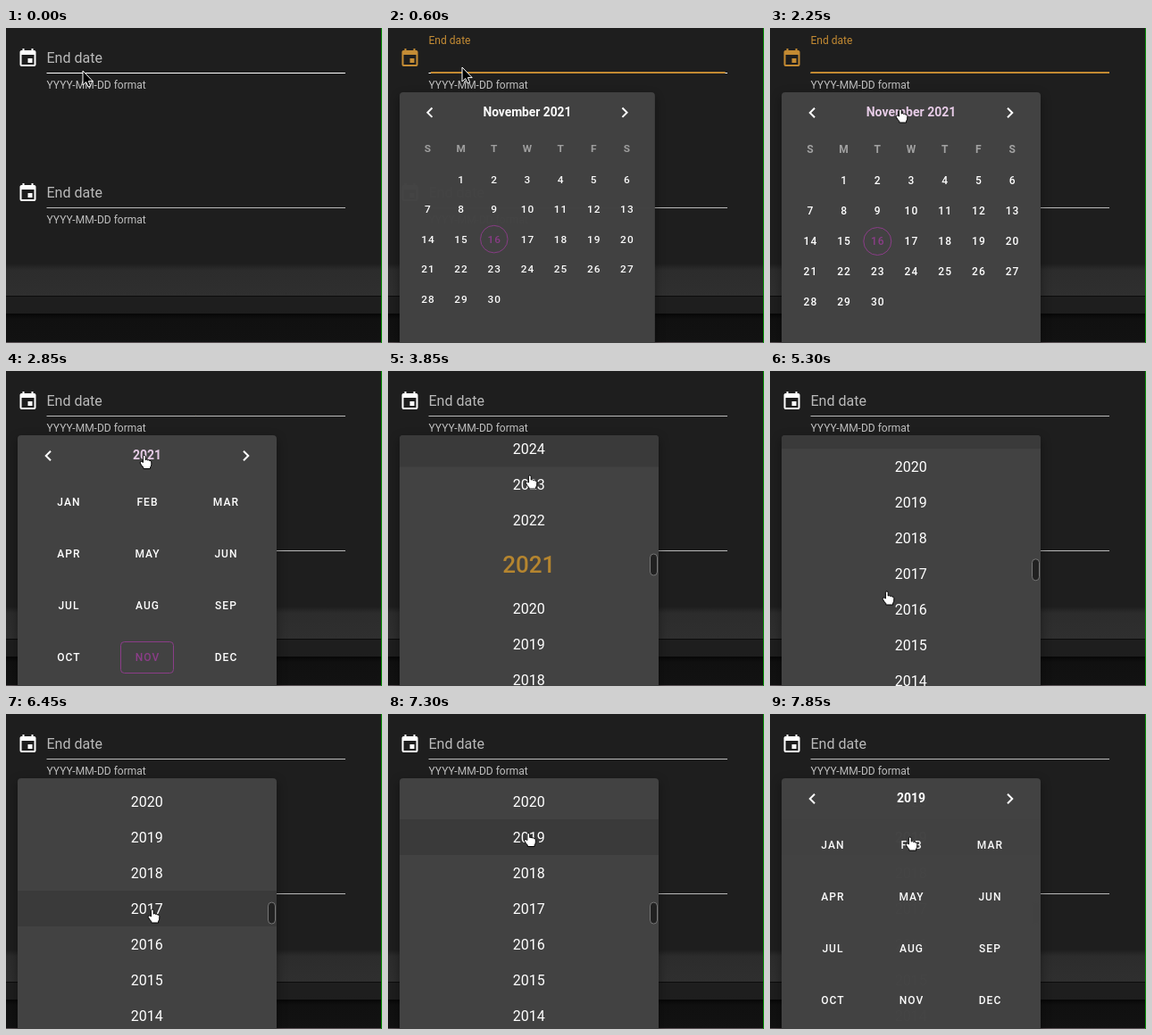
An HTML page that plays this animation: 421x353 px, repeating every 8 s.

```html
<!DOCTYPE html>
<html lang="en">
<head>
<meta charset="utf-8">
<title>Date picker</title>
<style>
  html, body { margin: 0; width: 100%; height: 100%; overflow: hidden; background: #1e1e1e; }
  svg { display: block; font-family: Roboto, sans-serif; font-size: 12px; fill: #fff; cursor: default; }
  .mid { text-anchor: middle; }
  .btn { font-weight: 500; letter-spacing: 1.07px; }
  .title { font-size: 14px; font-weight: 700; }
  .weekday { font-weight: 600; fill: #a2a2a2; }
  .today { fill: #8b3d88; }
  .ring { fill: none; stroke: #8b3d88; }
  .year { font-size: 16px; }
  .year.active { font-size: 26px; font-weight: 500; fill: #b5852f; }
  .sheet { fill: #424242; filter: drop-shadow(0 4px 6px rgba(0, 0, 0, .4)); }
</style>
</head>
<body>
<svg id="stage" width="421" height="353" viewBox="0 0 421 353">
  <defs>
    <linearGradient id="bar" x2="0" y2="1">
      <stop offset="0" stop-color="#1e1e1e"/>
      <stop offset=".2" stop-color="#2c2c2c"/>
      <stop offset="1" stop-color="#2f2f2f"/>
    </linearGradient>
    <linearGradient id="foot" x2="0" y2="1">
      <stop offset="0" stop-color="#070707"/>
      <stop offset=".2" stop-color="#101010"/>
      <stop offset="1" stop-color="#121212"/>
    </linearGradient>
    <clipPath id="sheetClip"><rect x="13" y="72" width="290" height="330" rx="4"/></clipPath>
  </defs>
  <rect width="421" height="353" fill="#1e1e1e"/>
  <rect y="264" width="421" height="36" fill="url(#bar)"/>
  <rect y="300" width="421" height="1" fill="#0c0c0c"/>
  <rect y="320" width="421" height="32" fill="url(#foot)"/>
  <rect y="352" width="421" height="1" fill="#5a5255"/>
  <rect x="420" width="1" height="353" fill="#0a920a"/>
  <g id="fields"></g>
  <g id="menu">
    <rect class="sheet" x="13" y="72" width="290" height="330" rx="4"/>
    <g clip-path="url(#sheetClip)">
      <g id="days"></g>
      <g id="months"></g>
      <g id="years"></g>
    </g>
  </g>
  <path id="arrow" d="M0 0V16L3.7 12.6L6.1 18L8.7 16.9L6.4 11.6H11.2Z" fill="#000" stroke="#fff"/>
  <path id="hand" fill="#fff" stroke="#000" stroke-linejoin="round"
    d="M-1.6 8V1.2Q-1.6 0 -.3 0Q1 0 1.2 1.2V5Q2.6 4 3.6 5.4Q5 4.6 5.8 6Q7.6 5.6 7.8 7.4V10Q7.8 12 6.6 13.2V15H-1.2V13.6Q-3.4 11.4 -4.8 8.6Q-5 7 -3.6 7Q-2.6 7 -1.6 8Z"/>
</svg>
<script>
const LOOP = 8000, STEP = 50;
const AMBER = [195, 138, 50], GREY = [186, 186, 186], WHITE = [255, 255, 255];
const CALENDAR = 'M19 19H5V8H19M16 1V3H8V1H6V3H5C3.89 3 3 3.89 3 5V19A2 2 0 0 0 5 21H19A2 2 0 0 0 21 19V5C21 3.89 20.1 3 19 3H18V1M17 12H12V17H17V12Z';
const LEFT = 'M15.41 16.58L10.83 12L15.41 7.41L14 6L8 12L14 18Z';
const RIGHT = 'M8.59 16.58L13.17 12L8.59 7.41L10 6L16 12L10 18Z';

// time, x, y of the pointer's tip
const POINTER = [
  [50, 86, 48], [150, 83, 44], [1400, 83, 44], [1450, 84.5, 46], [1800, 84.5, 46], [1850, 85, 47.5],
  [1950, 85, 47.5], [2050, 84, 41], [2250, 146, 91], [2450, 155, 94.5], [3650, 155, 94.5], [3700, 157, 96],
  [3800, 157, 96], [3850, 159, 117], [4050, 122, 215], [4300, 131, 247], [5700, 131, 247], [5950, 162.5, 219.5],
  [6400, 162.5, 219.5], [6450, 164, 219], [6850, 164, 219], [7200, 158, 129], [7400, 157, 138]
];

const $ = id => document.getElementById(id);

function add(parent, tag, attrs, text) {
  const el = document.createElementNS('http://www.w3.org/2000/svg', tag);
  set(el, attrs);
  if (text !== undefined) el.textContent = text;
  return parent.appendChild(el);
}
function set(el, attrs) {
  for (const k in attrs) el.setAttribute(k, attrs[k]);
}

const clamp = v => Math.max(0, Math.min(1, v));
const mix = (a, b, p) => a + (b - a) * p;
const blend = (a, b, p) => `rgb(${a.map((v, i) => Math.round(mix(v, b[i], p)))})`;

function bezier(x1, y1, x2, y2) {
  const curve = (a, b, s) => 3 * a * s * (1 - s) ** 2 + 3 * b * s * s * (1 - s) + s ** 3;
  return x => {
    let lo = 0, hi = 1;
    for (let i = 0; i < 24; i++) {
      const s = (lo + hi) / 2;
      if (curve(x1, x2, s) < x) lo = s; else hi = s;
    }
    return curve(y1, y2, hi);
  };
}
const swift = bezier(.25, .8, .25, 1), fade = bezier(.25, .8, .5, 1);
const run = (t, start, ms, ease) => t <= start ? 0 : t >= start + ms ? 1 : ease((t - start) / ms);

function pointerAt(t) {
  const i = POINTER.findIndex(k => k[0] >= t);
  if (i < 0) return POINTER[POINTER.length - 1].slice(1);
  if (i === 0) return POINTER[0].slice(1);
  const a = POINTER[i - 1], b = POINTER[i], p = (t - a[0]) / (b[0] - a[0]);
  return [mix(a[1], b[1], p), mix(a[2], b[2], p)];
}

function scrollAt(t) {
  if (t < 4650) return -26 * run(t, 4000, 300, fade);
  return mix(-26, 168.5, 1 - (1 - clamp((t - 4650) / 800)) ** 1.834);
}

// Text fields
function buildField(y) {
  const g = add($('fields'), 'g', { transform: `translate(0 ${y})` });
  const field = {
    icon: add(g, 'path', { d: CALENDAR, transform: 'translate(12.5 22)' }),
    label: add(g, 'text', { 'font-size': 16 }, 'End date'),
    line: add(g, 'rect', { x: 45.5, y: 50, width: 334.5, height: 1 }),
    focus: add(g, 'rect', { y: 49, height: 2, fill: blend(AMBER, AMBER, 0) })
  };
  add(g, 'text', { x: 45.5, y: 68, fill: '#c0c0c0' }, 'YYYY-MM-DD format');
  return field;
}
function drawField(f, focus, hover) {
  set(f.icon, { fill: blend(WHITE, AMBER, focus) });
  set(f.label, {
    fill: blend(GREY, AMBER, focus),
    transform: `translate(45.5 ${mix(39, 17.5, focus)}) scale(${mix(1, .75, focus)})`
  });
  set(f.line, { fill: hover ? '#fff' : '#bababa' });
  set(f.focus, { x: 212.75 - 167.25 * focus, width: 334.5 * focus });
}
const first = buildField(0), second = buildField(151);

// Calendar pages
function buildHeader(page) {
  add(page, 'path', { d: LEFT, transform: 'translate(35.3 83)' });
  add(page, 'path', { d: RIGHT, transform: 'translate(256.7 83)' });
  return add(page, 'text', { class: 'mid title', x: 158, y: 99 });
}
const dayTitle = buildHeader($('days')), monthTitle = buildHeader($('months'));
dayTitle.textContent = 'November 2021';

const column = i => 158 + (i - 3) * 37.7;
[...'SMTWTFS'].forEach((d, i) => add($('days'), 'text', { class: 'mid weekday', x: column(i), y: 140 }, d));
for (let d = 1; d <= 30; d++) {
  const x = column(d % 7), y = 171 + 34 * Math.floor(d / 7), now = d === 16;
  if (now) add($('days'), 'circle', { class: 'ring', cx: x, cy: y, r: 15.5 });
  add($('days'), 'text', { class: 'mid btn' + (now ? ' today' : ''), x: x + .5, y: y + 4.2 }, d);
}

const monthRing = add($('months'), 'rect', { class: 'ring', x: 128.5, y: 303.5, width: 59, height: 35, rx: 4 });
const monthTexts = 'JAN FEB MAR APR MAY JUN JUL AUG SEP OCT NOV DEC'.split(' ').map((m, i) =>
  add($('months'), 'text', { class: 'mid btn', x: 70.5 + 88 * (i % 3), y: 151.2 + 58 * Math.floor(i / 3) }, m));

// Year list
const rowBack = add($('years'), 'rect', { x: 13, width: 290, fill: '#3a3a3a' });
const list = add($('years'), 'g', {});
const thumb = add($('years'), 'rect', { x: 293.5, width: 8, height: 24, rx: 4, fill: '#212121', stroke: '#767676' });
const rows = [];
for (let year = 2027; year >= 2012; year--) {
  const gap = 2021 - year, active = gap === 0;
  const row = { mid: 217 + gap * 40 + Math.sign(gap) * 9.5, height: active ? 59 : 40 };
  add(list, 'text', { class: 'mid year' + (active ? ' active' : ''), x: 157.7, y: row.mid + (active ? 9.2 : 5.7) }, year);
  rows.push(row);
}

function drawYears(t) {
  const scroll = scrollAt(t);
  set(list, { transform: `translate(0 ${-scroll})` });
  set(thumb, { y: 205 + scroll * .036 });
  // the highlight lags the pointer and sticks while the list scrolls
  const seen = t >= 4650 && t < 5500 ? 4650 : t - STEP;
  const y = pointerAt(seen)[1] + scrollAt(seen);
  const row = rows.find(r => Math.abs(y - r.mid) <= r.height / 2);
  set(rowBack, row ? { y: row.mid - row.height / 2 - scroll, height: row.height } : { height: 0 });
}

function show(page, opacity) {
  set(page, { opacity, visibility: opacity > 0 ? 'visible' : 'hidden' });
}

function draw(t) {
  const [x, y] = pointerAt(t);
  const blur = run(t, 2560, 300, fade);
  drawField(first, t < 2560 ? run(t, 400, 280, swift) : 1 - blur, t < 2100);
  drawField(second, 0, false);

  const open = run(t, 400, 280, swift);
  show($('menu'), open);
  set($('menu'), { transform: `translate(13 72) scale(${open}) translate(-13 -72)` });

  const toYears = run(t, 3070, 330, fade), back = run(t, 7610, 300, fade);
  show($('days'), 1 - blur);
  show($('months'), t < 7610 ? blur * (1 - toYears) : back);
  show($('years'), toYears * (1 - back));
  drawYears(t);

  const later = t >= 7610;
  monthTitle.textContent = later ? '2019' : '2021';
  set(monthRing, { visibility: later ? 'hidden' : 'inherit' });
  set(monthTexts[10], { class: 'mid btn' + (later ? '' : ' today') });
  const fill = y > 84 && y < 105 && x > 107 && x < 208 ? '#e6cbe6' : '#fff';
  set(dayTitle, { fill });
  set(monthTitle, { fill });

  const overMenu = y > 80, transform = `translate(${x} ${y})`;
  set($('arrow'), { transform, visibility: overMenu ? 'hidden' : 'visible' });
  set($('hand'), { transform, visibility: overMenu ? 'visible' : 'hidden' });
}

const began = performance.now();
function tick() {
  const t = (performance.now() - began) % LOOP;
  draw(Math.floor(t / STEP) * STEP);
  requestAnimationFrame(tick);
}
tick();
</script>
</body>
</html>
```
